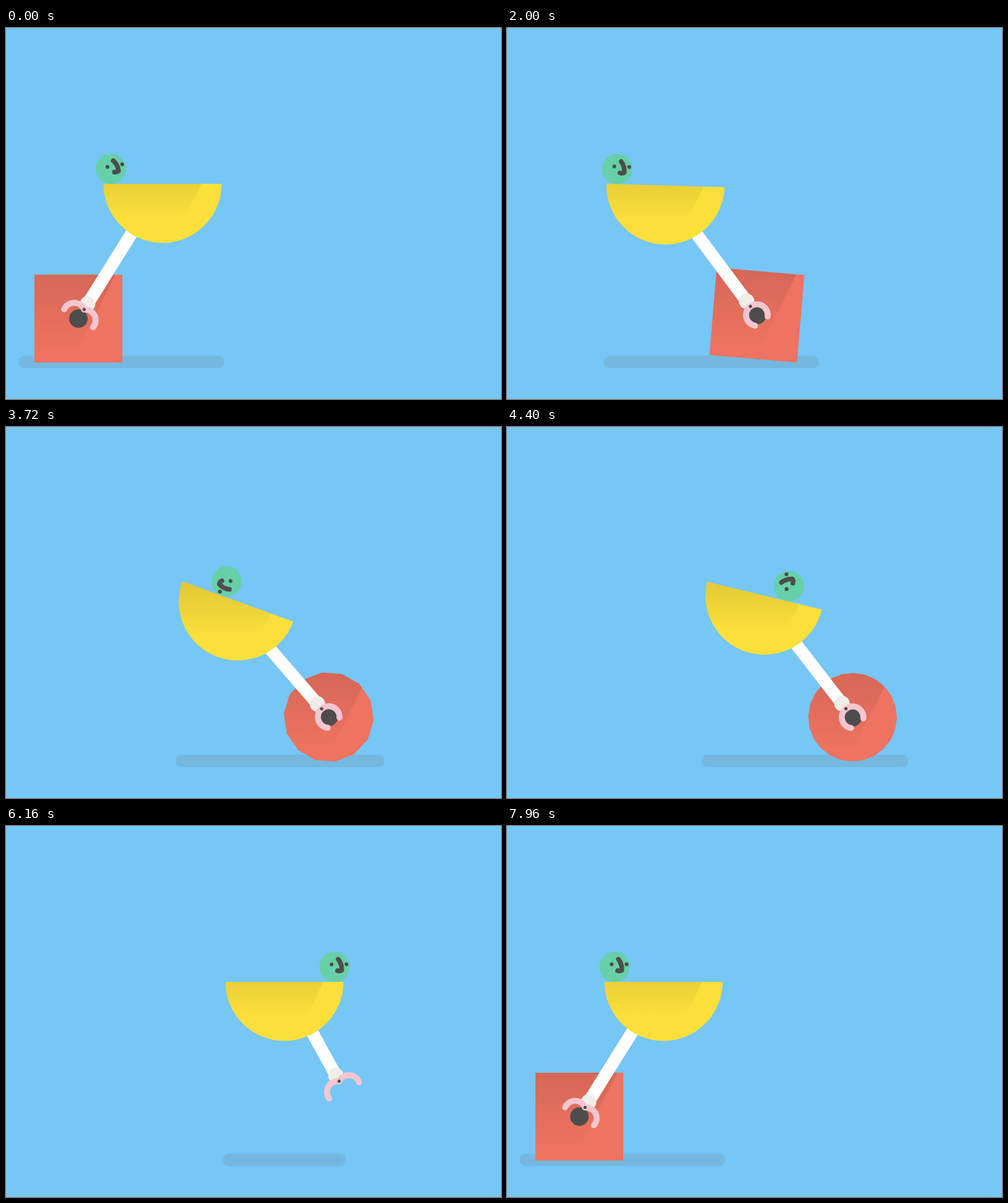
Write an HTML page with a canvas that moves like this. It is 800 by 600 pixels and loops after 8 s.

```html
<!DOCTYPE html>
<html lang="en">
<head>
<meta charset="utf-8">
<title>Rounding the box</title>
<style>
  html, body { margin: 0; width: 100%; height: 100%; overflow: hidden; background: #76c6f6; }
  canvas { display: block; }
</style>
</head>
<body>
<canvas id="stage" width="800" height="600"></canvas>
<script>
const g = document.getElementById('stage').getContext('2d');
const LOOP = 8000, RAD = Math.PI / 180, TAU = Math.PI * 2;
const FLOOR = 541, APOTHEM = 71, BOWL_R = 95.5, BALL_R = 24.5, JAW_R = 17.5;
const DARK = '#4d4d4d';

// Smooth interpolation without overshoot through [time, value, time, value, ...].
function key(t, k) {
  const n = k.length / 2;
  if (t <= k[0]) return k[1];
  if (t >= k[2 * n - 2]) return k[2 * n - 1];
  let i = 0;
  while (k[2 * i + 2] <= t) i++;
  const slope = j => (k[2 * j + 3] - k[2 * j + 1]) / (k[2 * j + 2] - k[2 * j]);
  const tangent = j => {
    if (j < 1 || j > n - 2) return 0;
    const a = slope(j - 1), b = slope(j);
    return a * b > 0 ? 2 * a * b / (a + b) : 0;
  };
  const h = k[2 * i + 2] - k[2 * i], u = (t - k[2 * i]) / h, v = 1 - u;
  return v * v * (1 + 2 * u) * k[2 * i + 1] + u * u * (3 - 2 * u) * k[2 * i + 3]
    + u * v * h * (v * tangent(i) - u * tangent(i + 1));
}

const bodyX = [1700, 253, 2520, 270, 2720, 281, 3360, 344, 3720, 374.5, 4200, 403,
  5000, 448, 5300, 450, 6250, 450, 6720, 387, 7050, 315, 7500, 253];
const bodyTilt = [1700, 0, 2520, 9.5, 2720, 15.6, 3400, 19.7, 3720, 20, 4200, 17,
  4700, 7, 5000, 2, 5300, 0, 6250, 0, 6720, -10, 7100, -9, 7560, 0];
const ballPos = [0, -83.5, 500, -79, 1900, -79, 2720, -69, 3400, -46, 3720, -28, 4200, 10,
  4700, 72, 5000, 91, 5150, 92, 5900, 81, 6500, 81, 6740, 76, 7100, 0, 7480, -84, 7900, -79];
const boxRoll = [180, 0, 840, 174, 930, 182.2, 965, 182.2, 1200, 180];
const boxX = [1300, 401, 1700, 401, 2520, 417, 2720, 428.5, 3360, 491, 3720, 521.5, 4200, 547,
  4500, 566, 4750, 602, 5000, 677.5, 5040, 692.5, 5400, 830, 6000, 1055];
const boxSpin = [1700, 0, 2520, 27, 2720, 45.8, 3720, 107, 4500, 145];
const boxSides = [1900, 4, 2400, 5, 2800, 5.9, 3720, 14.5, 4400, 24];
const boxShadow = [0, 3, 960, 0, 2520, 0, 2720, -1, 3360, -7, 3720, -10, 4200, -10, 5000, -7.5, 7400, 3];
const bodyShadow = [3720, 0, 4200, -1, 5000, -6, 5600, 0];
const shadeShift = [960, 0, 2720, 10, 3720, 6, 5000, 1];
const armFree = [4500, 0, 4800, 1, 7600, 1, 7860, 0];
const armAngle = [4500, 60, 5000, 61.4, 6250, 61.2, 6720, 15, 7000, 50, 7300, 115, 7500, 130, 7700, 122];
const armLength = [4900, 207, 5300, 201, 6300, 201, 6720, 212, 7200, 201];
const jawOpen = [60, 1, 160, 0, 4450, 0, 4600, 1];
const eyeOpen = [860, 1, 930, .3, 980, .3, 1060, 1];

function box(t) {
  if (t < 1300) {
    const spin = key(t, boxRoll), q = Math.floor(spin / 90);
    const x = 188 + 142 * q + APOTHEM * Math.SQRT2 * Math.sin((spin - 90 * q - 45) * RAD);
    return { x, spin, sides: 4 };
  }
  if (t > 6000) return { x: key(t, [6720, -112, 7500, 117]), spin: 0, sides: 4 };
  return {
    x: key(t, boxX), spin: key(t, boxSpin),
    sides: t > 4450 ? 90 : Math.floor(key(t, boxSides))
  };
}

function polygon({ sides, spin }) {
  const r = APOTHEM / Math.cos(Math.PI / sides);
  return Array.from({ length: sides }, (_, i) => {
    const a = Math.PI / 2 + spin * RAD + (i + .5) * TAU / sides;
    return [r * Math.cos(a), r * Math.sin(a)];
  });
}

function disc(x, y, r, color, ry = r) {
  g.fillStyle = color;
  g.beginPath();
  g.ellipse(x, y, r, ry, 0, 0, TAU);
  g.fill();
}

function stroke(width, color) {
  g.lineWidth = width;
  g.strokeStyle = color;
  g.stroke();
}

function at(x, y, angle, draw) {
  g.save();
  g.translate(x, y);
  g.rotate(angle);
  draw();
  g.restore();
}

// Darkens the clipped shape to the left of a slanted edge, fading downwards.
function shade(edge, top, bottom, alpha) {
  const fade = g.createLinearGradient(0, top, 0, bottom);
  fade.addColorStop(0, `rgba(0,0,0,${alpha})`);
  fade.addColorStop(1, 'rgba(0,0,0,0)');
  g.fillStyle = fade;
  g.beginPath();
  g.moveTo(-150, -120);
  g.lineTo(edge + 60, -120);
  g.lineTo(edge - 60, 120);
  g.lineTo(-150, 120);
  g.fill();
}

function shadow(x) {
  g.beginPath();
  g.moveTo(x - 90, 540);
  g.lineTo(x + 90, 540);
  stroke(20, '#74b8e0');
}

function drawBox(b, points, shift) {
  at(b.x, b.y, 0, () => {
    g.beginPath();
    points.forEach(p => g.lineTo(...p));
    g.closePath();
    g.fillStyle = '#ee7360';
    g.fill();
    g.clip();
    shade(24.5 + shift, -APOTHEM, 52, .1);
  });
  disc(b.x, b.y, 15, DARK);
}

function drawArm(body, grip, angle, open) {
  const ax = body.x + 92 * Math.cos(angle), ay = body.y + 92 * Math.sin(angle);
  const dir = Math.atan2(grip.y - ay, grip.x - ax);
  const reach = Math.hypot(grip.x - ax, grip.y - ay);
  at(grip.x, grip.y, dir, () => {
    g.lineCap = 'butt';
    g.beginPath();
    g.moveTo(-reach - 20, 0);
    g.lineTo(-28, 0);
    stroke(20, '#fff');
    g.lineCap = 'round';
    disc(-28, 0, 12.5, '#f0eee9');
    for (const side of [-1, 1]) {
      at(-JAW_R, 0, side * open * 35.5 * RAD, () => {
        g.beginPath();
        g.arc(JAW_R, 0, JAW_R, Math.PI, Math.PI - side * 134 * RAD, side > 0);
        stroke(9.7, '#f5c6d0');
      });
    }
    disc(-JAW_R, 0, 2.6, DARK);
  });
}

function drawBowl(body) {
  at(body.x, body.y, 0, () => {
    g.beginPath();
    g.arc(0, 0, BOWL_R, body.tilt, body.tilt + Math.PI);
    g.closePath();
    g.fillStyle = '#fbdf3b';
    g.fill();
    g.clip();
    shade(63, -32, 55, .11);
  });
}

function drawBall(body, s, eye) {
  at(body.x, body.y, body.tilt, () => at(s, -24.3, (s + 79) / 25.5, () => {
    disc(0, 0, BALL_R, '#66d0a8');
    g.beginPath();
    g.moveTo(6, -12.2);
    g.quadraticCurveTo(12, -5, 11.6, 5.5);
    g.quadraticCurveTo(8, 7.5, 4.7, 6.2);
    stroke(7.6, DARK);
    disc(-4.8, -4, 3.1, DARK, 3.1 * eye);
    disc(19.3, -4, 3.1, DARK, 3.1 * eye);
  }));
}

function draw(t) {
  g.fillStyle = '#76c6f6';
  g.fillRect(0, 0, 800, 600);
  g.lineCap = g.lineJoin = 'round';

  const tilt = key(t, bodyTilt) * RAD;
  const body = { x: key(t, bodyX), y: 252 + 88 * Math.max(0, Math.sin(tilt)), tilt };
  const b = box(t), points = polygon(b);
  b.y = FLOOR - Math.max(...points.map(p => p[1]));

  const free = key(t, armFree), a = key(t, armAngle) * RAD, len = key(t, armLength);
  const mix = (from, to) => from + (to - from) * free;
  const grip = {
    x: mix(b.x, body.x + len * Math.cos(a)),
    y: mix(b.y, body.y + len * Math.sin(a))
  };
  const aim = Math.atan2(grip.y - body.y, grip.x - body.x);
  const bend = (1 - free) * Math.max(0, 60 * RAD - aim) / 2;

  shadow(b.x + key(t, boxShadow));
  shadow(body.x + key(t, bodyShadow));
  drawBox(b, points, key(t, shadeShift));
  drawArm(body, grip, aim + bend, key(t, jawOpen));
  drawBowl(body);
  drawBall(body, key(t, ballPos), key(t, eyeOpen));
}

const start = performance.now();
function tick() {
  draw((performance.now() - start) % LOOP);
  requestAnimationFrame(tick);
}
tick();
</script>
</body>
</html>
```
